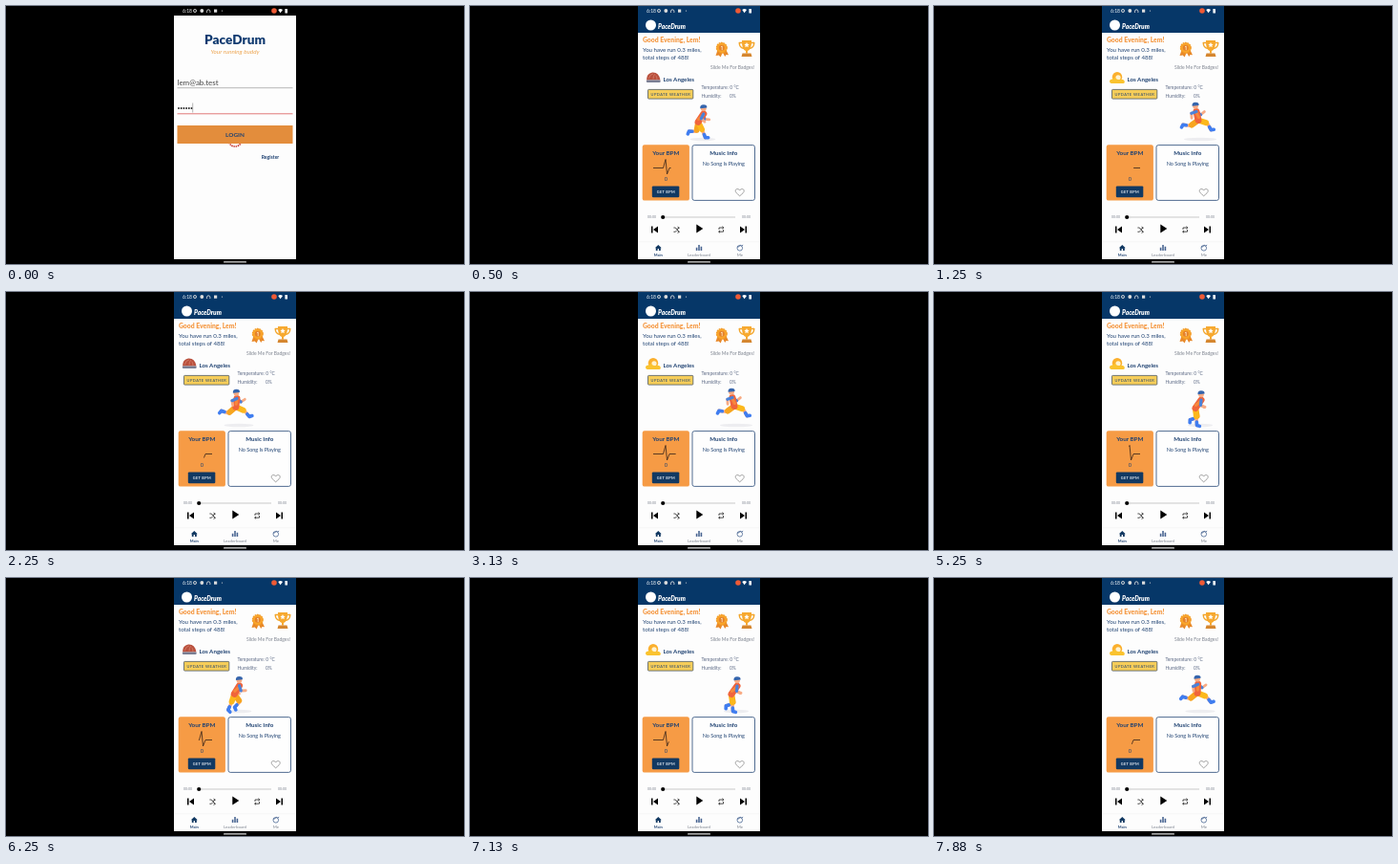
Animation of 480 by 270 pixels, one loop 8000 ms. Source, as an HTML page:

```html
<!DOCTYPE html>
<html lang="en">
<head>
<meta charset="utf-8">
<style>
  html, body { margin: 0; width: 100%; height: 100%; overflow: hidden; background: #000; }
  svg { display: block; width: 100vw; height: 100vh; }
  text { font-family: Lato, "Open Sans", sans-serif; fill: #1f4272; white-space: pre; }
  .b { font-weight: 700; }
  .x { font-weight: 900; }
  .m { text-anchor: middle; }
  .g { fill: #7c828e; }
  .t { fill: #5b6884; }
  .l { fill: none; stroke-linecap: round; stroke-linejoin: round; }
</style>
</head>
<body>
<svg viewBox="0 0 480 270">
  <rect width="480" height="270"/>
  <rect x="176" y="10" width="128" height="255" fill="#fdfdfd"/>

  <g id="login">
    <text class="x m" x="240" y="40" font-size="13.6" style="fill:#103a70">PaceDrum</text>
    <text class="m" x="240" y="50" font-size="6.3" font-style="italic" style="fill:#eda44e">Your running buddy</text>
    <text x="179.5" y="82.6" font-size="8" style="fill:#444">lem@ab.test</text>
    <path d="M179.5 85.7h121" stroke="#999" stroke-width=".7"/>
    <path d="M181 107h14" class="l" stroke="#222" stroke-width="1.9" stroke-dasharray="0 2.7"/>
    <path d="M195.7 101.5v10" stroke="#888" stroke-width=".6"/>
    <path d="M179.5 112.8h121" stroke="#dd6a6a" stroke-width=".9"/>
    <circle id="spinner" cx="240" cy="140" r="7" fill="none" stroke="#c9433c" stroke-width="1.6" stroke-dasharray="1.5 .7"/>
    <rect x="179.5" y="125" width="121" height="19" fill="#e38d3c"/>
    <text class="b m" x="240" y="137.2" font-size="6.4">LOGIN</text>
    <text class="b m" x="277" y="159.8" font-size="5.1">Register</text>
  </g>

  <g id="main">
    <rect x="176" width="128" height="28" fill="#063768"/>
    <circle cx="189.5" cy="20" r="5.5" fill="#fff"/>
    <text class="x" x="197" y="24.2" font-size="6.5" font-style="italic" style="fill:#fff">PaceDrum</text>

    <text class="x" x="181" y="38.4" font-size="6.8" style="fill:#f59a45">Good Evening, Lem!</text>
    <g font-size="6.1">
      <text x="181" y="48.2">You have run 0.3 miles,</text>
      <text x="181" y="56.4">total steps of 488!</text>
    </g>

    <!-- medal -->
    <path d="M259.5 46l-2 6 3.200-.5 2 2 2-5 2.500 4.500 1.300-2 2.500.2-2.500-5.200z" fill="#e8892a"/>
    <circle cx="263.800" cy="43.800" r="5.400" fill="#f9a62c" stroke="#f39a24" stroke-width="1.200" stroke-dasharray="1.800 .6"/>
    <circle cx="263.800" cy="43.800" r="3" fill="#e5802a"/>
    <path d="M263.300 42.600l.9-.6v3.800" class="l" stroke="#fff0c8" stroke-width=".8"/>

    <!-- trophy -->
    <path d="M285 38.500h-2.800q.2 5.500 5 6M295 38.500h2.800q-.2 5.500-5 6" class="l" stroke="#f2a52b" stroke-width="1.400"/>
    <path d="M285 36h10q.5 9-4 11v2.500h-2v-2.500q-4.500-2-4-11z" fill="#f7a92f"/>
    <path d="M290 38l.8 1.800 1.900.2-1.400 1.300.4 1.900-1.700-1-1.700 1 .4-1.900-1.400-1.300 1.900-.2z" fill="#fff"/>
    <path d="M285.500 49.500h9l1 3.500h-11z" fill="#d5862f"/>

    <text class="m g" x="275" y="66" font-size="5">Slide Me For Badges!</text>
    <text class="b" x="202.500" y="79.200" font-size="6.200">Los Angeles</text>
    <g id="sun">
      <circle cx="192" cy="74.300" r="5.200" fill="#fbb02e"/>
      <circle cx="193" cy="74.800" r="2.600" fill="#fff3d0"/>
      <path d="M184 79q0-2.500 3-2.500 2-2.500 4.500 0 2.500 1.500 4.500.3 4 0 3.800 3.200-.5 1-1.500 1h-12.500q-1.800-.4-1.800-2z" fill="#fac32f"/>
    </g>
    <g id="cloud">
      <path d="M185 77.500q0-7 6-8 7-.5 8.500 8z" fill="#b9503d"/>
      <path d="M187.500 75.500q1-4 4-4.500M192 76q0-3 1.500-4.500M196 76.500q0-2-1-3.500" class="l" stroke="#dc8a74" stroke-width=".7"/>
      <path d="M186 78.800h12.500" class="l" stroke="#7a7f94" stroke-width="2.400"/>
    </g>
    <rect x="186.500" y="87.400" width="47.300" height="9.700" rx=".8" fill="#f6cd59" stroke="#4d5860" stroke-width=".8"/>
    <text class="m" x="210.400" y="93.600" font-size="4" letter-spacing=".45">UPDATE WEATHER</text>
    <g font-size="4.900">
      <text class="t" x="242.500" y="87">Temperature:</text>
      <text class="t" x="272.300" y="87">0 °C</text>
      <text class="t" x="242.500" y="95.800">Humidity:</text>
      <text class="t" x="272" y="95.800">0%</text>
    </g>
    <g id="runner" class="l"></g>

    <rect x="180.700" y="145.300" width="49.200" height="58.300" rx="2.200" fill="#f69b45"/>
    <text class="b m" x="205.300" y="156.400" font-size="6.300">Your BPM</text>
    <path id="pulse" d="M192 169.500H202.500L205 160.500 206.500 176 209 169.500H216" fill="none" stroke="#402a1c" stroke-width=".85"/>
    <text class="m" x="205.300" y="183" font-size="5.600">0</text>
    <rect x="190.800" y="188.400" width="28.500" height="11.800" rx="1.200" fill="#123962"/>
    <text class="b m" x="205.400" y="195.800" font-size="3.900" letter-spacing=".35" style="fill:#e9eef5">GET BPM</text>

    <rect x="233" y="145.600" width="65.500" height="57.800" rx="2.200" fill="#fefefe" stroke="#3f5d86" stroke-width=".9"/>
    <text class="b m" x="265.800" y="156.400" font-size="6.200">Music Info</text>
    <text class="m" x="265.800" y="167.200" font-size="5.450">No Song Is Playing</text>
    <path d="M282.700 198.800C279.500 196 278.200 195 278.200 193.500 278.200 191 281.500 190.800 282.700 193 283.900 190.800 287.200 191 287.200 193.500 287.200 195 285.900 196 282.700 198.800z" fill="none" stroke="#8a8a8a" stroke-width=".8"/>

    <!-- player -->
    <g font-size="3.500" class="g">
      <text x="186" y="222.300" class="g">00:00</text>
      <text x="285" y="222.300" class="g">00:00</text>
    </g>
    <path d="M202 221h76" stroke="#bbb" stroke-width=".8"/>
    <circle cx="202.200" cy="221" r="2.100"/>
    <path d="M197 230.500v7l-5-3.500zM190 230.500h1.500v7H190zM237.300 228.500v9l7-4.500zM283 230.500v7l5-3.500zM288.500 230.500h1.500v7h-1.500z"/>
    <path d="M213.800 232l1.500 0 3.500 4.200M213.800 236.300l1.600 0 1-1.200M217.200 233.600l1.200-1.300M217.900 231.300l1.500.9-1.500 1M217.900 235.400l1.500.9-1.500 1
      M261 233.500v-1.500h4.500M264.700 231l1.100 1-1.100 1M265.500 234.500v1.700H261M261.800 235.200l-1.100 1 1.100 1" class="l" stroke="#222" stroke-width=".8"/>

    <!-- bottom navigation -->
    <path d="M176 246.700h128" stroke="#f2f2f2" stroke-width=".6"/>
    <path d="M193.800 253.200l3.500-3.200 3.500 3.200h-1v2.900h-1.800v-2h-1.400v2h-1.800v-2.900z" fill="#123962"/>
    <path d="M236.800 252.800h1.600v3.300h-1.600zM239.200 250h1.600v6.100h-1.600zM241.600 251.800h1.600v4.300h-1.600z" fill="#4a6692"/>
    <circle cx="282.800" cy="253.300" r="2.800" fill="none" stroke="#4a6692" stroke-width=".8"/>
    <path d="M280.300 252.200q2.500 0 3-2 1 1.800 2.600.2" class="l" stroke="#4a6692" stroke-width=".8"/>
    <g font-size="4.400">
      <text class="b m" x="197.300" y="261.800" font-size="4">Main</text>
      <text class="m g" x="240" y="261.800">Leaderboard</text>
      <text class="m g" x="282.800" y="261.800">Me</text>
    </g>
  </g>

  <!-- status bar and gesture bar -->
  <g fill="#ddd">
    <text x="185" y="7" font-size="5" style="fill:#fff">6:18</text>
    <circle cx="198" cy="5" r="1.600" fill="none" stroke="#ddd" stroke-width=".8"/>
    <circle cx="198" cy="5" r=".6"/>
    <circle cx="205.300" cy="5" r="1.900"/>
    <path d="M210.500 6.500v-1a1.700 1.700 0 0 1 3.400 0v1" class="l" stroke="#ddd" stroke-width=".9"/>
    <rect x="218" y="3.500" width="3.200" height="3.200"/>
    <circle cx="226.500" cy="5" r=".6"/>
    <circle cx="281" cy="5" r="2.800" fill="#ef5a35"/>
    <path d="M285.200 4q2.400-2 4.800 0l-2.400 3.200z" fill="#fff"/>
    <rect x="292.400" y="3" width="2.600" height="4.500" rx=".5" fill="#fff"/>
    <rect x="228" y="267.300" width="24" height="1.300" rx=".6"/>
  </g>
</svg>
<script>
const LOOP = 8000, MAIN_AT = 500, STRIDE = 940, BEAT = 512;
const el = id => document.getElementById(id);
const show = (id, on) => el(id).style.display = on ? '' : 'none';
const easeOut = v => 1 - (1 - Math.min(1, Math.max(0, v))) ** 2;
const pulse = el('pulse'), pulseLength = pulse.getTotalLength();

// Angles are measured from straight down, positive is forward.
const step = ([x, y], angle, length) => [x + Math.sin(angle) * length, y + Math.cos(angle) * length];
const line = (points, color, width) =>
  `<path d="M${points.map(p => p.map(v => v.toFixed(2))).join('L')}" stroke="${color}" stroke-width="${width}"/>`;

function leg(hip, phase, shorts) {
  const thigh = .15 + 1.1 * Math.cos(phase);
  const shin = thigh - .75 + .7 * Math.sin(phase);
  const knee = step(hip, thigh, 10), ankle = step(knee, shin, 8);
  const calf = step(knee, shin, 4.5), toe = step(ankle, shin + 1.2, 3);
  return line([knee, ankle], '#f8ab84', 3.4) + line([calf, ankle, toe], '#3f7df0', 3.6) +
    line([hip, step(hip, thigh, 8.5)], shorts, 6);
}

function arm(shoulder, phase, sleeve) {
  const upper = -.15 + 1.1 * Math.cos(phase);
  const elbow = step(shoulder, upper, 5.5), hand = step(elbow, upper + 1.3, 5);
  return line([elbow, hand], '#f8ab84', 2.8) + line([shoulder, elbow], sleeve, 3.2);
}

function runner(time, x) {
  const phase = 2 * Math.PI * (time - 1250) / STRIDE, back = phase + Math.PI;
  const gather = Math.abs(Math.sin(phase));
  const hip = [x + 2 - 3 * gather, 119.5 + 2 * gather];
  const shoulder = [x + 5 * gather, 110.5 + 2.5 * gather];
  const [headX, headY] = [x - 1 + 6 * gather, 104.800 + 2.5 * gather];
  return `<ellipse cx="${x + 4}" cy="139.5" rx="${17 - 4 * gather}" ry="1.7" fill="#ededf0"/>` +
    arm(shoulder, phase, '#4b82d9') +
    leg(hip, back, '#f7a51f') + leg(hip, phase, '#fcb81c') +
    line([hip, shoulder], '#f0643c', 7) +
    line([step(hip, 3, 3), step(shoulder, 0, 1)], '#f7883c', 3) +
    arm(shoulder, back, '#4b82d9') +
    `<circle cx="${headX}" cy="${headY}" r="2.9" fill="#f8ab84"/>` +
    `<path d="M${headX - 3.5} ${headY}q-.5-4 3.500-4t3.500 3.200z" fill="#3565ad"/>`;
}

function draw(time) {
  const started = time >= MAIN_AT, away = Math.floor(time / 1000) % 2 === 0;
  show('login', !started);
  show('main', started);
  show('sun', !away);
  show('cloud', away);
  el('spinner').setAttribute('transform', `rotate(${time * .36} 240 140)`);
  el('runner').innerHTML = runner(time, away ? 240 : 275);

  // The trace draws itself in, then its tail catches up with its tip.
  const u = (((time - 1250) / BEAT + .5) % 1 + 1) % 1;
  const erasing = u >= .22 && u < .67;
  const from = erasing ? pulseLength * easeOut((u - .22) / .45) : 0;
  const to = erasing ? pulseLength : pulseLength * easeOut(((u + .33) % 1) / .55);
  pulse.setAttribute('stroke-dasharray', `0 ${from} ${to - from} ${pulseLength * 2}`);
}

const start = performance.now();
(function frame() {
  draw((performance.now() - start) % LOOP);
  requestAnimationFrame(frame);
})();
</script>
</body>
</html>
```
